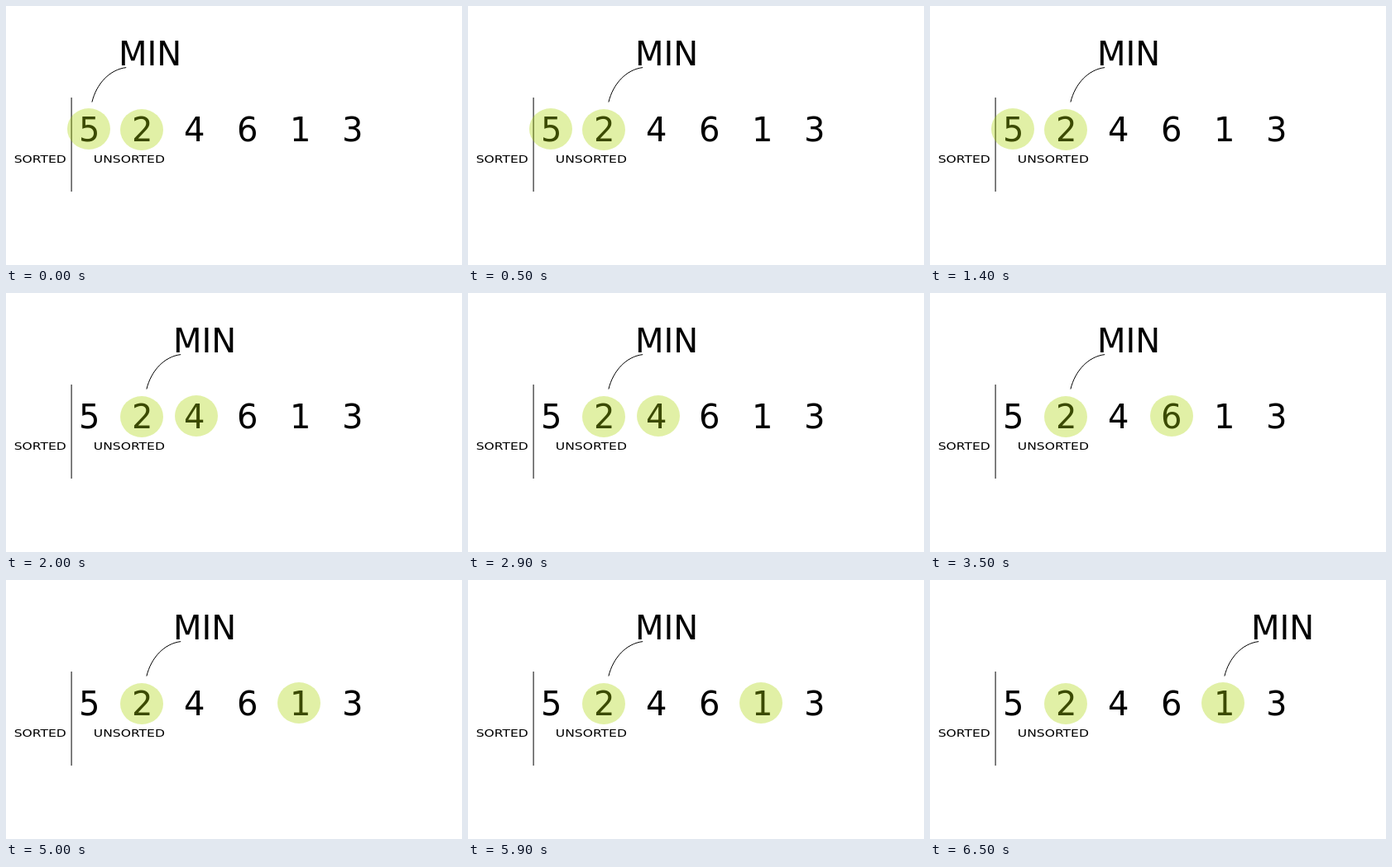
An HTML page for the animation above (8000 ms loop, 551 by 314 pixels).

```html
<!DOCTYPE html>
<html>
<head>
<meta charset="utf-8">
<style>
html, body { margin: 0; width: 100%; height: 100%; overflow: hidden; background: #fff; }
svg { display: block; width: 100%; height: 100%; }
text { font-family: "DejaVu Sans", sans-serif; font-size: 40px; }
.label { font-size: 12.5px; }
.line { fill: none; stroke: #000; }
ellipse { fill: #aad400; fill-opacity: .35; }
</style>
</head>
<body>
<svg viewBox="0 0 551 314">
  <path class="line" d="M79.1 111V225"/>
  <g id="digits"></g>
  <text class="label" transform="translate(9.7 190) scale(1.245 1)">SORTED</text>
  <text class="label" transform="translate(105.8 190) scale(1.245 1)">UNSORTED</text>
  <g id="min">
    <text x="136" y="72">MIN</text>
    <path class="line" d="M103.9 116.5C109.4 94 125.4 77 145.2 74.6"/>
  </g>
  <ellipse id="best" rx="26" ry="25"/>
  <ellipse id="probe" rx="26" ry="25"/>
</svg>
<script>
const LOOP = 8000, STEP = 1500, LEAD = 1000;
const digits = [5, 2, 4, 6, 1, 3];
const spots = [[100, 149], [164, 150], [230, 149], [292, 149], [354, 149]];
const $ = id => document.getElementById(id);

// Scan for the minimum: one step per comparison, one more when MIN moves.
const steps = [];
let min = 0;
for (let probe = 1; probe < spots.length; probe++) {
  const best = min;
  steps.push({ best, probe, min });
  if (digits[probe] < digits[min]) {
    min = probe;
    steps.push({ best, probe, min });
  }
}

$("digits").innerHTML = digits
  .map((d, i) => `<text x="${Math.round(88 + 63.65 * i)}" y="164">${d}</text>`).join("");

function place(id, spot) {
  const [x, y] = spots[spot];
  $(id).setAttribute("cx", x);
  $(id).setAttribute("cy", y);
}

function draw(now) {
  // The first step is already under way when the loop begins.
  const { best, probe, min } = steps[Math.floor((now % LOOP + LEAD) / STEP)];
  place("best", best);
  place("probe", probe);
  $("min").setAttribute("transform", `translate(${Math.min(66 * min, 4 + 62 * min)})`);
  requestAnimationFrame(draw);
}
draw(0);
</script>
</body>
</html>
```
